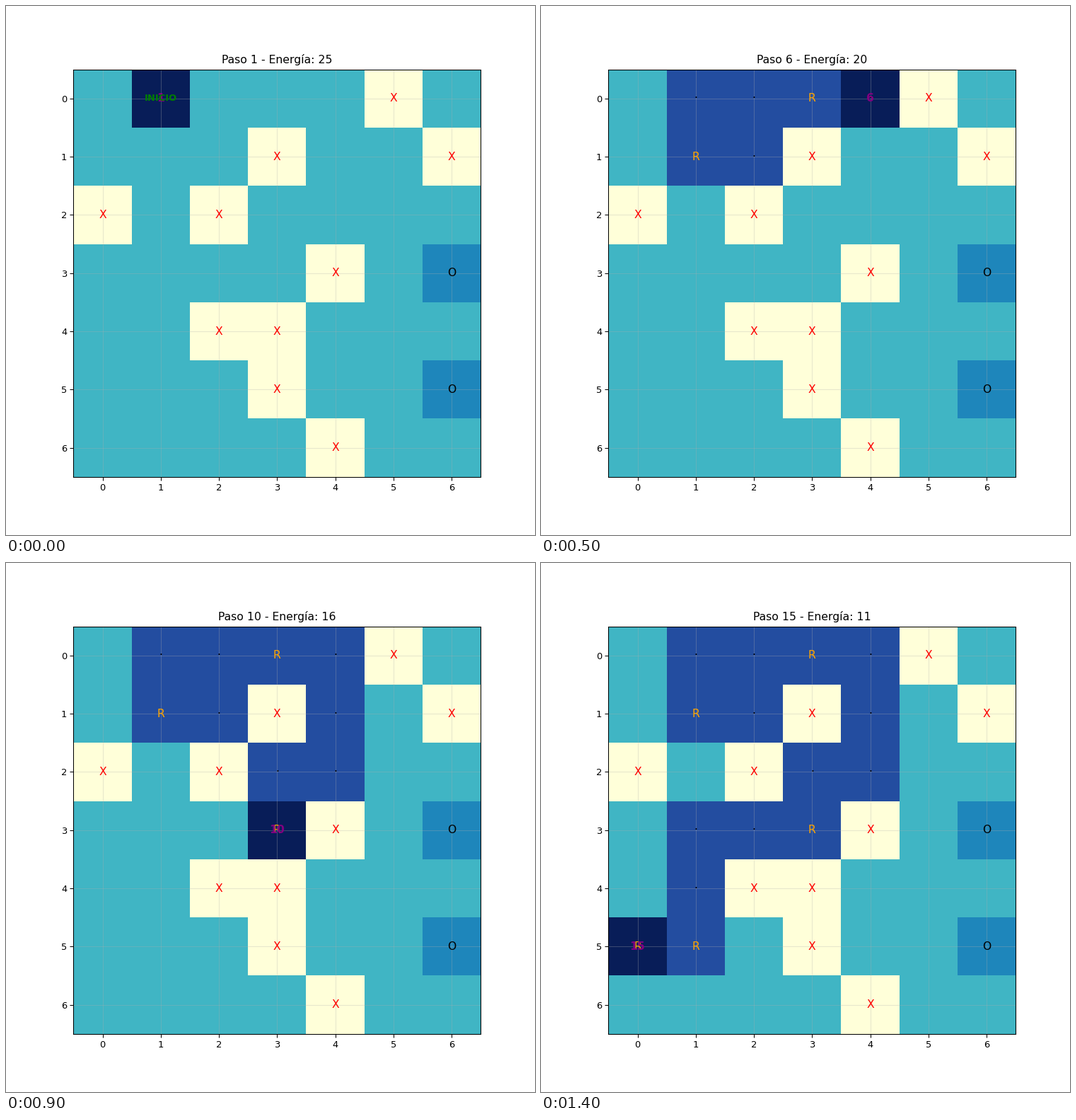
These frames come from a looping animation (748 px wide and 748 px high, 1.5 s). A matplotlib script:

```python
import numpy as np
import matplotlib.pyplot as plt
from matplotlib.animation import FuncAnimation

# S start, X wall, O goal, R charger
MAP = """
.S.R.X.
.R.X..X
X.X....
...RX.O
..XX...
RR.X..O
....X..
""".split()
MOVES = "DRURRDDLDLLDDL"
STEP = {"U": (-1, 0), "D": (1, 0), "L": (0, -1), "R": (0, 1)}
START_ENERGY = 26

VALUE = {"X": -1, "O": 0.3}
VISITED, CURRENT = 0.6, 1

cells = np.array([list(line) for line in MAP])
size = len(cells)
base = np.array([[VALUE.get(c, 0) for c in line] for line in MAP], float)
path = [tuple(np.argwhere(cells == "S")[0])]
for move in MOVES:
    path.append(tuple(np.add(path[-1], STEP[move])))


def cell_text(cell, label, color, fontsize=12, **style):
    row, col = cell
    return ax.text(col, row, label, color=color, fontsize=fontsize,
                   ha="center", va="center", **style)


fig, ax = plt.subplots(figsize=(8, 8), dpi=93.5)
edges = np.arange(size + 1) - 0.5
board = ax.pcolormesh(edges, edges, base, cmap="YlGnBu", vmin=-1, vmax=1)
ax.set(aspect="equal", xlim=(-0.5, size - 0.5), ylim=(size - 0.5, -0.5),
       xticks=range(size), yticks=range(size))
ax.grid(True, alpha=0.3)
title = ax.set_title("", pad=6.8)

for mark, color in (("X", "red"), ("O", "black")):
    for cell in np.argwhere(cells == mark):
        cell_text(cell, mark, color)

trail = [cell_text(cell, "R", "orange") if cells[cell] == "R"
         else cell_text(cell, "·", "black") for cell in path]
counter = cell_text(path[0], "", "purple", weight="bold")
start = cell_text(path[0], "INICIO", "green", fontsize=10, weight="bold")


def draw(i):
    grid = base.copy()
    for cell in path[:i]:
        grid[cell] = VISITED
    grid[path[i]] = CURRENT
    board.set_array(grid)

    for k, mark in enumerate(trail):
        mark.set_visible(k <= i)
    start.set_visible(i == 0)

    step = i + 1
    row, col = path[i]
    counter.set_position((col, row))
    counter.set_text(str(step))
    title.set_text(f"Paso {step} - Energía: {START_ENERGY - step}")
    return [board, title, start, counter, *trail]


anim = FuncAnimation(fig, draw, frames=len(path), interval=100,
                     repeat=True, repeat_delay=0)
plt.show()
```
